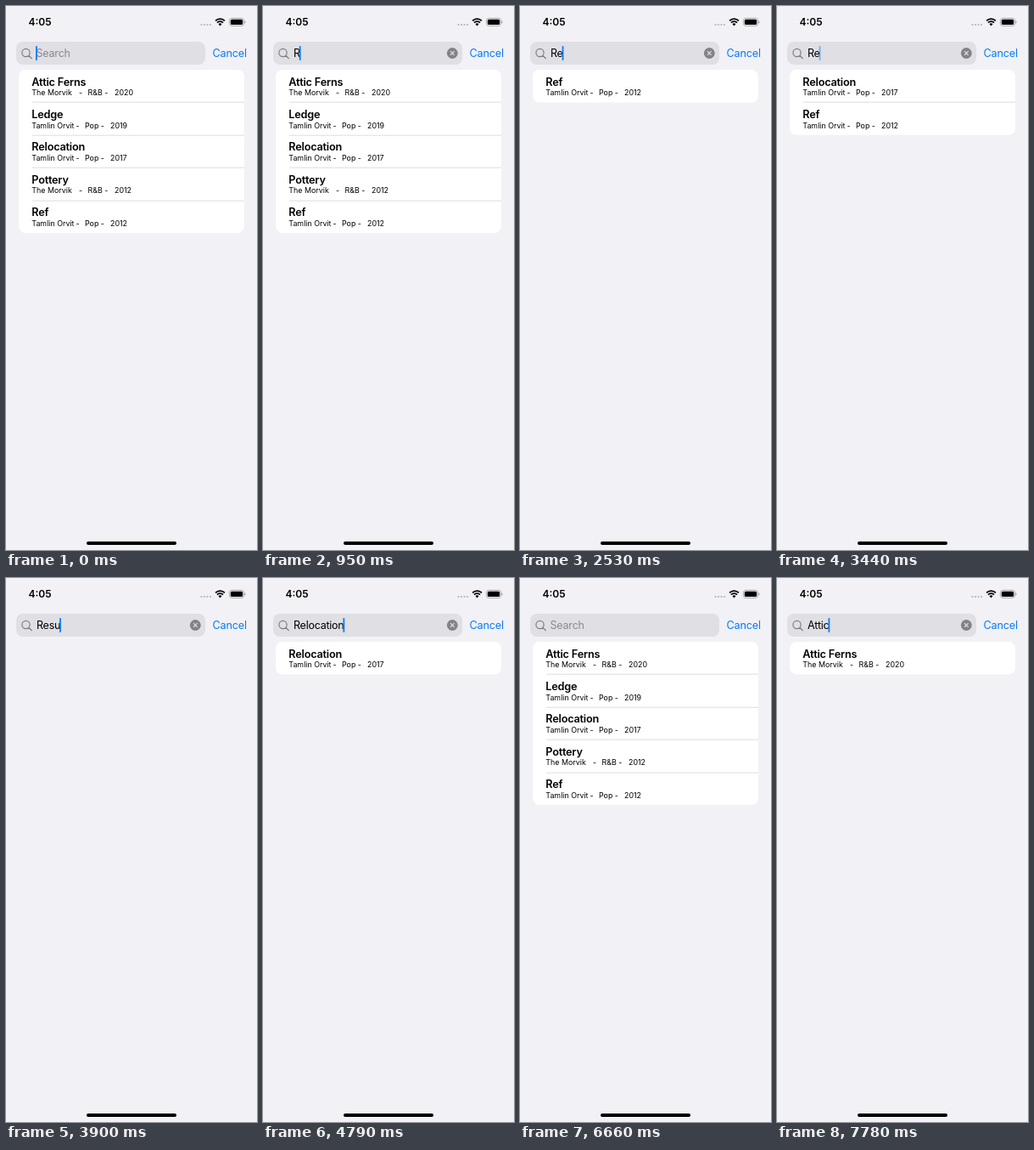
An HTML page with a canvas that plays this animation: 296x640 px, repeating every 8000 ms.

```html
<!DOCTYPE html>
<html lang="en">
<head>
<meta charset="utf-8">
<title>Album search</title>
<style>
html, body { margin: 0; width: 100%; height: 100%; overflow: hidden; background: #f1f1f6; }
canvas { display: block; width: 296px; height: 640px; }
</style>
</head>
<body>
<canvas></canvas>
<script>
const canvas = document.querySelector('canvas');
const ctx = canvas.getContext('2d');
const scale = window.devicePixelRatio || 1;
canvas.width = 296 * scale;
canvas.height = 640 * scale;

const LOOP = 8000, ROW = 38.4, LIST_TOP = 75, BLUE = '#087cf5';

const pop = { artist: 'Tamlin Orvit', genre: 'Pop -', columns: [82.5, 93, 123] };
const rnb = { artist: 'The Morvik', genre: 'R&B -', columns: [86, 96.5, 128] };
const albums = [
  ['Attic Ferns', rnb, 2020],
  ['Ledge', pop, 2019],
  ['Relocation', pop, 2017],
  ['Pottery', rnb, 2012],
  ['Ref', pop, 2012],
];

// [start ms, value]
const typing = [
  [0, ''], [830, 'R'], [1570, 'Re'], [2140, 'Ref'], [2530, 'Re'],
  [3750, 'Resu'], [4020, 'Res'], [4130, 'Re'], [4250, 'Rel'], [4370, 'Relo'],
  [4490, 'Reloc'], [4600, 'Relocat'], [4790, 'Relocation'], [5210, 'Relocatio'],
  [5410, 'Reloca'], [5560, 'R'], [5770, ''],
  [7050, 'A'], [7520, 'Att'], [7640, 'Atti'], [7780, 'Attic'],
];
// The list follows the typed text with a delay.
const filtering = [
  [0, ''], [1380, 'R'], [2410, 'Ref'], [2840, 'Re'], [3900, 'Resu'],
  [4250, 'Re'], [4490, 'Rel'], [6120, ''], [7050, 'A'],
];
const caretAlpha = [
  [0, 1], [470, .5], [590, 0], [830, 1], [3440, .5], [3560, 0], [3750, 1],
  [6420, .5], [6660, 0], [7050, 1], [7320, .4], [7520, 1],
];

const at = (track, t) => track.findLast(([start]) => start <= t)[1];

function text(str, x, y, size, color = '#000', weight = 400, spacing = 0) {
  ctx.font = `${weight} ${size}px Inter, sans-serif`;
  ctx.letterSpacing = spacing + 'px';
  ctx.fillStyle = color;
  ctx.fillText(str, x, y);
  return ctx.measureText(str).width;
}

function box(x, y, w, h, r, color) {
  ctx.fillStyle = color;
  ctx.beginPath();
  ctx.roundRect(x, y, w, h, r);
  ctx.fill();
}

function disc(x, y, r, color) {
  box(x - r, y - r, 2 * r, 2 * r, r, color);
}

function stroke(d, color, width) {
  ctx.strokeStyle = color;
  ctx.lineWidth = width;
  ctx.stroke(new Path2D(d));
}

function statusBar() {
  text('4:05', 26.5, 23, 12, '#000', 600);
  for (let i = 0; i < 4; i++) disc(230.5 + i * 3.5, 22, 1.1, '#b4b4b8');
  stroke('M247.1 17.4A7.6 7.6 0 0 1 257.9 17.4M249 19.6A4.9 4.9 0 0 1 256 19.6', '#000', 1.8);
  ctx.fillStyle = '#000';
  ctx.fill(new Path2D('M252.5 23.4L250.5 21.3A2.9 2.9 0 0 1 254.5 21.3Z'));
  ctx.strokeStyle = '#a4a4a8';
  ctx.lineWidth = .9;
  ctx.beginPath();
  ctx.roundRect(263.4, 14.4, 17.2, 9, 2.8);
  ctx.stroke();
  box(264.8, 15.8, 14.4, 6.2, 1.6, '#000');
  box(281.4, 17.4, 1.1, 3, .6, '#a4a4a8');
}

function searchBar(query, caret) {
  box(12, 42, 223, 27, 8, '#dfdfe4');
  stroke('M28.1 55A4.6 4.6 0 1 1 18.9 55A4.6 4.6 0 1 1 28.1 55M26.8 58.3L30.6 62', '#7e7e83', 1.2);
  text('Cancel', 243.5, 60, 12.7, BLUE, 400, -.2);
  let caretX = 35;
  if (query) {
    caretX += text(query, 36, 60, 12.5, '#000', 400, -.25);
    disc(223.3, 55.5, 6.4, '#828287');
    stroke('M221 53.2L225.6 57.8M225.6 53.2L221 57.8', '#e6e6ea', 1.1);
  } else {
    text('Search', 35.5, 60, 12.5, '#89898e', 400, -.2);
  }
  ctx.globalAlpha = caret;
  box(caretX, 47, 1.8, 17, .8, BLUE);
  ctx.globalAlpha = 1;
}

function albumList(filter) {
  const rows = albums.filter(([title]) => title.startsWith(filter));
  if (!rows.length) return;
  box(15, LIST_TOP, 266, rows.length * ROW, 7.5, '#fff');
  rows.forEach(([title, { artist, genre, columns }, year], i) => {
    const y = LIST_TOP + i * ROW;
    if (i) box(31, Math.round(y) - .3, 250, .7, 0, '#d2d2d6');
    text(title, 30.3, y + 18.6, 12.7, '#000', 600, -.2);
    text(artist, 30.3, y + 30.2, 8.9);
    ['-', genre, year].forEach((part, k) => text(part, columns[k], y + 30.2, 8.9));
  });
}

function draw() {
  const t = performance.now() % LOOP;
  ctx.setTransform(scale, 0, 0, scale, 0, 0);
  box(0, 0, 296, 640, 0, '#f1f1f6');
  statusBar();
  searchBar(at(typing, t), at(caretAlpha, t));
  albumList(at(filtering, t));
  box(95, 630, 106, 4, 2, '#000');
  requestAnimationFrame(draw);
}
draw();
</script>
</body>
</html>
```
